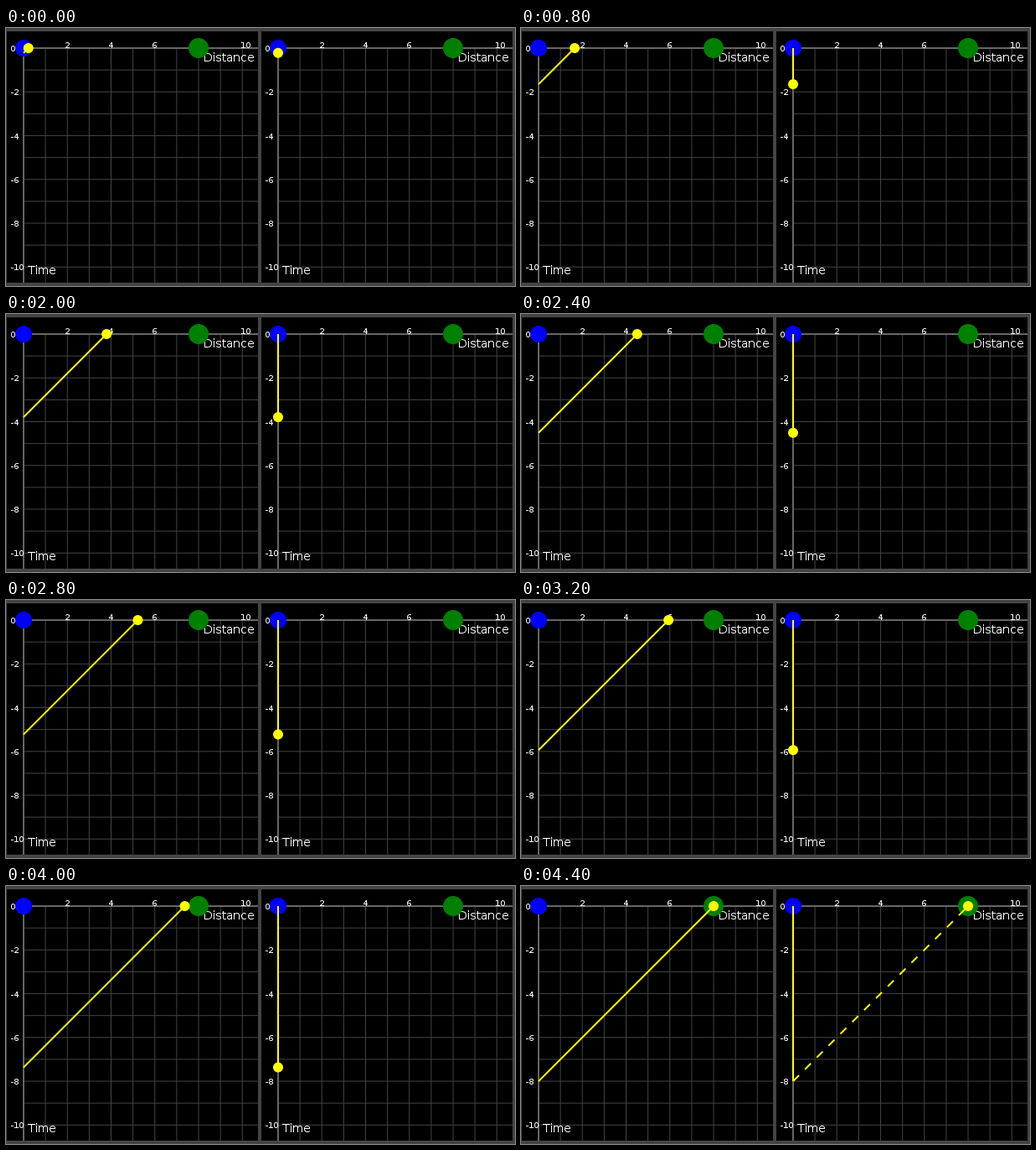
Recreate the animation shown at these times as a matplotlib script. Size 608 by 308 pixels, loop 6500 ms.

```python
import matplotlib.pyplot as plt
from matplotlib.animation import FuncAnimation
from matplotlib.patches import Circle, Rectangle

W, H, DPI = 608, 308, 100
UNIT = 26.13                 # pixels per axis unit
PANEL_LEFTS = (1, 305)
TOP, SIZE = 4, 300
ORIGIN_X, ORIGIN_Y = 20, 24  # origin x is relative to the panel
TARGET = 8
STEPS, ARRIVAL = 65, 44

plt.rcParams.update({
    "font.family": "DejaVu Sans",
    # whole-pixel letter advances, as in browser text
    "text.hinting": "native",
    "text.hinting_factor": 1,
})
fig = plt.figure(figsize=(W / DPI, H / DPI), dpi=DPI, facecolor="#444444")
ax = fig.add_axes([0, 0, 1, 1])
ax.set_xlim(0, W)
ax.set_ylim(H, 0)
ax.axis("off")


def pt(px):
    return px * 72 / DPI


def line(xs, ys, color, width, z, **style):
    return ax.plot(xs, ys, color=color, lw=pt(width), zorder=z, snap=False,
                   solid_capstyle="butt", dash_capstyle="butt", **style)[0]


def dot(x, y, radius, color, z):
    return ax.add_patch(Circle((x, y), radius, fc=color, ec="none", zorder=z))


def label(x, baseline, text, px):
    ax.text(x, baseline, text, color="white", fontsize=pt(px),
            va="baseline", zorder=4)


def draw_panel(left):
    ox, oy = left + ORIGIN_X, ORIGIN_Y
    right, bottom = left + SIZE, TOP + SIZE
    ax.add_patch(Rectangle((left, TOP), SIZE, SIZE, fc="black", ec="none",
                           antialiased=False))
    for i in range(1, 11):
        x, y = ox + i * UNIT, oy + i * UNIT
        line([x, x], [oy, bottom], "#444444", 1, 2)
        line([ox, right], [y, y], "#444444", 1, 2)
    line([ox, right], [oy, oy], "#666666", 2, 3)
    line([ox, ox], [oy, bottom], "#666666", 2, 3)
    for n in range(0, 11, 2):
        if n:
            label(ox + n * UNIT - 5.1 + 1.5 * len(str(n)), 24, str(n), 10)
        label(left + 3.6, oy + n * UNIT + 4.1, str(-n), 10)
    label(left + 235, 40, "Distance", 14)
    label(left + 25, 294, "Time", 14)
    dot(ox, oy, 10, "blue", 5)
    dot(ox + TARGET * UNIT, oy, 12, "green", 5)
    return ox


left_x, right_x = [draw_panel(left) for left in PANEL_LEFTS]
end_y = ORIGIN_Y + TARGET * UNIT

slope = line([], [], "yellow", 2, 6)
drop = line([], [], "yellow", 2, 6)
dashed = line([right_x, right_x + TARGET * UNIT], [end_y, ORIGIN_Y],
              "yellow", 2, 6, dashes=(5, 5))
left_dot = dot(left_x, ORIGIN_Y, 6, "yellow", 7)
right_dot = dot(right_x, ORIGIN_Y, 6, "yellow", 7)


def update(step):
    arrived = step >= ARRIVAL
    shift = UNIT * (TARGET if arrived else 0.22 + 0.1787 * step)
    y = ORIGIN_Y + shift
    slope.set_data([left_x, left_x + shift], [y, ORIGIN_Y])
    drop.set_data([right_x, right_x], [ORIGIN_Y, y])
    left_dot.center = left_x + shift, ORIGIN_Y
    right_dot.center = (right_x + shift, ORIGIN_Y) if arrived else (right_x, y)
    dashed.set_visible(arrived)
    return slope, drop, dashed, left_dot, right_dot


anim = FuncAnimation(fig, update, frames=STEPS, interval=100,
                     repeat=True, repeat_delay=0, blit=False)
plt.show()
```
